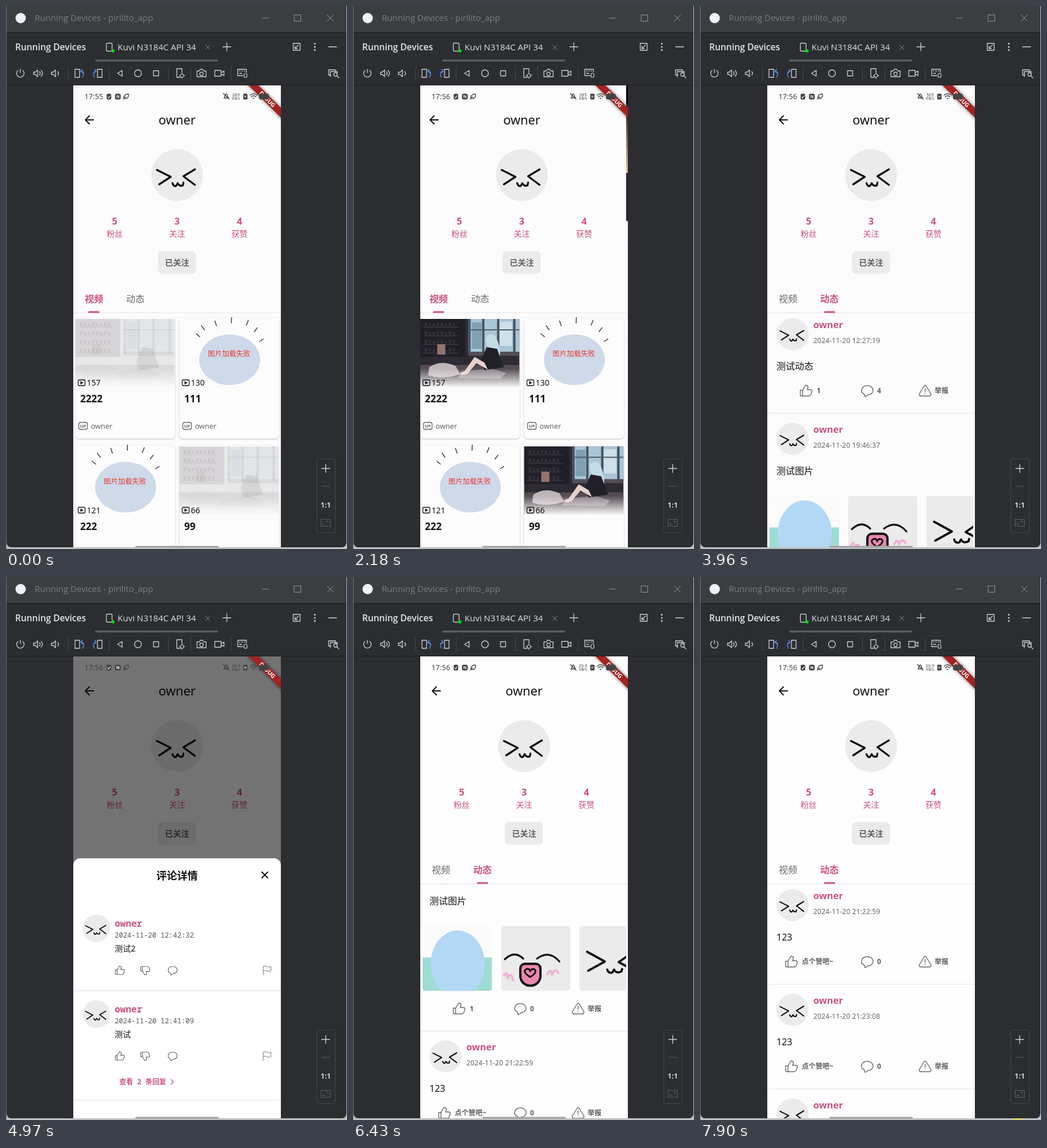
An HTML page with a canvas for the animation above (7970 ms loop, 593 by 944 pixels).

```html
<!DOCTYPE html>
<html lang="zh-CN">
<head>
<meta charset="utf-8">
<title>Running Devices</title>
<style>
html, body { margin: 0; width: 100%; height: 100%; overflow: hidden; background: #2b2d30; }
canvas { display: block; width: 593px; height: 944px; }
</style>
</head>
<body>
<canvas id="stage"></canvas>
<script>
const LOOP = 7970;
const USER = 'owner';
const PINK = '#c95478', GRAY = '#666', TILE = '#ebebeb', PAGE = '#fcfcfc', CHROME = '#ced0d6';
const SANS = '"Noto Sans", "Noto Sans CJK SC", "Noto Sans CJK", sans-serif';
const MONO = '"Noto Sans Mono", "Noto Sans CJK SC", "Noto Sans CJK", monospace';
const UI = '"Open Sans", sans-serif';

const canvas = document.getElementById('stage');
const c = canvas.getContext('2d');
const dpr = window.devicePixelRatio || 1;
canvas.width = 593 * dpr;
canvas.height = 944 * dpr;

// ---- helpers ----
const clamp = v => Math.max(0, Math.min(1, v));
const lin = (t, a, b) => clamp((t - a) / (b - a));
const ease = (t, a, b) => 1 - Math.pow(1 - lin(t, a, b), 3);
const smooth = (t, a, b) => { const u = lin(t, a, b); return u * u * (3 - 2 * u); };

function text(s, x, cy, size, color = '#111', { w = 400, align = 'left', font = SANS } = {}) {
  c.font = `${w} ${size}px ${font}`;
  c.textAlign = align;
  c.fillStyle = color;
  c.fillText(s, x, cy + size * 0.36);
}
function box(x, y, w, h, color) { c.fillStyle = color; c.fillRect(x, y, w, h); }
function round(x, y, w, h, r, fill, stroke, lw = 1) {
  c.beginPath();
  c.roundRect(x, y, w, h, r);
  if (fill) { c.fillStyle = fill; c.fill(); }
  if (stroke) { c.strokeStyle = stroke; c.lineWidth = lw; c.stroke(); }
}
function disc(x, y, r, color) {
  c.beginPath();
  c.arc(x, y, r, 0, 7);
  c.fillStyle = color;
  c.fill();
}
function oval(x, y, rx, ry, color) {
  c.beginPath();
  c.ellipse(x, y, rx, ry, 0, 0, 7);
  c.fillStyle = color;
  c.fill();
}
function icon(d, x, y, color = GRAY, lw = 1.4, sx = 1, sy = sx) {
  c.save();
  c.translate(x, y);
  c.scale(sx, sy);
  c.lineCap = c.lineJoin = 'round';
  c.strokeStyle = color;
  c.lineWidth = lw / sx;
  c.stroke(new Path2D(d));
  c.restore();
}
function shape(d, color) { c.fillStyle = color; c.fill(new Path2D(d)); }
function fade(y0, y1, from, to) {
  const g = c.createLinearGradient(0, y0, 0, y1);
  g.addColorStop(0, from);
  g.addColorStop(1, to);
  return g;
}
function clipped(x, y, w, h, r, draw) {
  c.save();
  c.beginPath();
  c.roundRect(x, y, w, h, r);
  c.clip();
  draw();
  c.restore();
}
function shifted(x, y, draw) {
  c.save();
  c.translate(x, y);
  draw();
  c.restore();
}
function faded(a, draw) {
  c.save();
  c.globalAlpha *= a;
  draw();
  c.restore();
}

const LIKE = 'M-10-1h4v10h-2q-2 0-2-2zM-6-1l4-7q1-3 4-1q2 1 1 4l-1 3h5q4 0 3 4l-2 5q-1 2-3 2h-11';
const BUBBLE = 'M-5 6C-14 2-10-9 0-9C13-9 13 7 1 7q-1 2-5 3z';
const WARN = 'M-2-8q2-3 4 0l8 13q1 4-3 4h-14q-4 0-3-4zM0-4v5M0 4v.6';
const FLAG = 'M-7 8v-15q4-2 7 0t7 0v8q-4 2-7 0t-7 0';
const CROSS = 'M-5-5l10 10M5-5l-10 10';

function face(x, y, r) {
  disc(x, y, r, TILE);
  icon('M-35-9L-11 3L-31 16M31-10L11 2L31 17M-8 14q2 6 6 5l3-5q3 6 9 4l1-5', x, y, '#111', 3.4 * r / 45, r / 45);
}
function playBadge(x, y, w, h, color) {
  round(x, y, w, h, 2, null, color, 1.3);
  const mx = x + w / 2, my = y + h / 2;
  shape(`M${mx - 2} ${my - 3}l5 3l-5 3z`, color);
}
function upBadge(x, y) {
  round(x, y, 15, 12, 3, null, GRAY, 1.3);
  text('UP', x + 7.5, y + 6, 7.5, GRAY, { w: 700, align: 'center' });
}
function dots(x, y) { for (const d of [-7, 0, 7]) disc(x + d, y, 1.3, '#888'); }

// Dim room with a bright window and a seated silhouette, 173 x 119 units.
function scene(x, y, w, h, lamp = false) {
  clipped(x, y, w, h, 0, () => {
    c.translate(x, y);
    c.scale(w / 173, h / 119);
    box(0, 0, 173, 119, '#2d2a34');
    box(0, 0, 78, 66, '#201f27');
    for (let i = 0; i < 4; i++) {
      box(5, 14 + i * 15, 62, 1, '#45414a');
      for (let j = 0; j < 8; j++) box(8 + j * 7, 6 + i * 15 + j % 3, 4, 7 - j % 3, j % 2 ? '#302d36' : '#37313a');
    }
    box(84, 0, 89, 58, '#a9c6d6');
    box(90, 6, 17, 46, '#7f9fb4');
    box(138, 5, 22, 42, '#cfe0e8');
    for (const px of [84, 108, 134, 162]) box(px, 0, 4, 60, '#454f5d');
    box(84, 18, 89, 2, '#4f5c6a');
    box(30, 44, 14, 18, '#94736f');
    box(84, 57, 89, 7, '#514d58');
    box(0, 80, 173, 39, '#554b53');
    shape('M16 84Q36 70 62 82L70 96Q40 106 14 98z', '#bfb6bb');
    shape('M70 92L122 86L150 94L140 104L66 103z', '#8d8288');
    shape('M114 34Q119 23 130 29Q141 46 139 66L126 70L117 48z', '#c5dbe5');
    shape('M116 49L134 52L146 84L112 89L106 72z', '#1f2028');
    shape('M112 76L95 66L78 90L70 94L72 98L82 96L98 77L118 88z', '#e5d0cc');
    if (lamp) {
      box(0, 0, 24, 78, fade(8, 70, '#3a2c2e', '#eebd9e'));
      box(0, 70, 24, 49, '#2b2529');
    }
  });
}
function failedImage(x, y) {
  const spokes = [[-52, -31], [-44, -43], [-23, -50], [3, -55], [29, -51], [43, -40], [52, -23]];
  for (const [a, b] of spokes) icon(`M${a} ${b}l${a * 0.12} ${b * 0.17}`, x, y, '#333', 1.4);
  oval(x, y + 9, 53, 44, '#ced9ea');
  text('图片加载失败', x - 1, y - 1, 12.3, '#e8392f', { align: 'center' });
}

// ---- window ----
function chrome() {
  box(0, 0, 593, 944, '#bfc0c2');
  box(0, 0, 1, 944, '#77797c');
  round(1, -8, 591, 949, 8, '#2b2d30');
  box(1, 0, 591, 46, '#3b3e40');
  box(1, 45.5, 591, 1.5, '#1e1f22');
  box(1, 137, 591, 1, '#1e1f22');
  disc(25.5, 21, 9, '#eef3fb');
  text('Running Devices - pirilito_app', 50, 21, 15, '#7c7e80', { font: UI });
  const dim = '#94969a';
  icon('M-5.5 0h11', 451, 21, dim, 1);
  icon('M-5.5-5.5h11v11h-11z', 507, 21, dim, 1);
  icon(CROSS, 564, 21, dim, 1, 1.1);

  text('Running Devices', 16, 71.5, 15.5, '#e6e7e9', { w: 600, font: UI });
  round(174.5, 64.5, 10, 14, 2, null, CHROME, 1.3);
  disc(186, 78, 2.8, '#00dc14');
  text('Kuvi N3184C API 34', 194, 71.5, 15, '#dfe1e5', { font: UI });
  icon(CROSS, 351, 72, '#85878c', 1, 0.75);
  icon('M-7 0h14M0-7v14', 384, 71, CHROME, 1.3);
  round(155, 93, 214, 3.5, 2, '#5b5d63');
  icon('M-6-6h12v12h-12zM3-3l-6 6M-3-1v4h4', 505.5, 71, CHROME, 1.3);
  for (const y of [65.5, 71, 76.5]) disc(537, y, 1.5, CHROME);
  icon('M-7 0h14', 568, 71, CHROME, 1.4);
  toolbar();

  round(540.5, 787.5, 32, 128, 3, null, '#43454a');
  icon('M-7 0h14M0-7v14', 556, 804, CHROME, 1.4);
  icon('M-7 0h14', 556, 835, '#5a5d63', 1.2);
  text('1:1', 556, 867, 12.5, CHROME, { w: 700, align: 'center', font: UI });
  icon('M-8-6h16v12h-16zM-4 0v3h3M4 0v-3h-3', 556, 898.5, '#5a5d63', 1.2);
}
function toolbar() {
  const y = 117;
  const speaker = 'M-8-2h3l4-4v12l-4-4h-3z';
  const device = 'M-4-7h8v14h-8z';
  for (const x of [108, 179, 282, 321, 391]) box(x, 105, 1, 24, '#43454a');
  const tools = [
    ['M0-7v6M-4-5A6.5 6.5 0 1 0 4-5', 25], [speaker + 'M2-3q3 3 0 6M5-5q5 5 0 10', 56],
    [speaker + 'M3-3q3 3 0 6', 87], [device, 124], [device, 163],
    ['M4-5v10L-4 0z', 198], ['M6 0A6 6 0 1 1-6 0A6 6 0 1 1 6 0', 229.5], ['M-4.5-4.5h9v9h-9z', 261],
    ['M1 7h-6v-15h9v6', 302], ['M-8-4h4l2-3h4l2 3h4v10h-16zM3 1A3 3 0 1 1-3 1A3 3 0 1 1 3 1', 340],
    ['M-8-5h11v10h-11zM3-1l5-3v8l-5-3', 371],
    ['M1 4h-9v-11h15v5M-5-4h1M-1-4h1M3-4h1M-5 0h4', 411], ['M-4 3h-4v-9h12v2M-5 6v-9h12v3', 569]
  ];
  for (const [d, x] of tools) icon(d, x, y, CHROME, 1.3);
  const turn = 'M-1-4Q6-2 1 7M1-7l-3 3l3 3';
  icon(turn, 132, y, '#548af7', 1.5);
  icon(turn, 155, y, '#548af7', 1.5, -1, 1);
  icon('M3 0A3 3 0 1 1-3 0A3 3 0 1 1 3 0M0-5v2M0 3v2M-5 0h2M3 0h2', 306, 121, CHROME, 1.2);
  round(414, 117, 5, 7, 2, null, CHROME, 1.2);
  icon('M3 0A3 3 0 1 1-3 0A3 3 0 1 1 3 0M2 2l4 4', 573, 119, CHROME, 1.3);
}

// ---- status bar and ribbon ----
function status(t) {
  const ink = '#444';
  const video = t >= 1340 && t < 1900;
  text(t < 300 ? '17:55' : '17:56', 136.5, 157, 12.7, video && t >= 1550 ? '#ddd' : ink);
  round(175, 152.5, 8, 10, 2, ink);
  icon('M-2 0l1.5 2l3-4', 179, 158, '#fff', 1.1);
  round(189.5, 152.5, 10, 10, 3, ink);
  text('N', 194.5, 157.5, 7, '#fff', { w: 700, align: 'center' });
  icon('M-4 3Q-4-4 4-4Q5 4-2 4M-5 5l4-4', 209, 157, ink, 1.4);
  if (video) return;
  icon('M-4 3h8q-2-2-2-5q-2-4-4 0q0 3-2 5M-5-5L5 5', 383, 157, ink, 1.4);
  const rate = t < 3220 ? '285' : t < 4970 ? '505' : '29.5';
  text(rate, 400, 154.5, 7.5, ink, { align: 'center' });
  text('KB/s', 400, 161, 6.5, ink, { align: 'center' });
  round(412.5, 152.5, 7.5, 10, 1.5, ink);
  icon('M-1.5-1.5l3 3M1.5-1.5l-3 3', 416.2, 157.5, '#fff', 1);
  icon('M-6-2Q0-7 6-2M-4 1Q0-3 4 1M-1 3.5h2', 430.5, 157, ink, 1.4);
  round(440, 152.5, 17, 10, 3, ink);
}
function ribbon() {
  c.save();
  c.translate(478.5, 138);
  c.rotate(Math.PI / 4);
  c.shadowColor = 'rgba(0,0,0,.6)';
  c.shadowBlur = 6 * dpr;
  box(-60, 28, 120, 12, '#a32222');
  c.shadowBlur = 0;
  text('DEBUG', 0, 34, 10.2, '#fff', { w: 800, align: 'center' });
  c.restore();
}

// ---- profile ----
function card(x, y, plays, title, thumbAlpha) {
  c.save();
  c.shadowColor = 'rgba(0,0,0,.25)';
  c.shadowBlur = 2.5 * dpr;
  c.shadowOffsetY = dpr;
  round(x, y, 173.5, 210, 6, PAGE);
  c.restore();
  if (thumbAlpha === null) failedImage(x + 87.5, y + 64);
  else {
    faded(thumbAlpha, () => scene(x, y + 2, 173, 119));
    box(x, y + 88, 173.5, 34, fade(y + 88, y + 122, 'rgba(252,252,252,0)', PAGE));
  }
  playBadge(x + 5, y + 108, 12, 10, '#111');
  text(plays, x + 20, y + 113, 14, '#111');
  text(title, x + 8.5, y + 141, 17, '#111', { w: 700 });
  upBadge(x + 6, y + 182);
  text(USER, x + 27, y + 188, 12.6, GRAY);
}
function grid(t) {
  const a = 0.09 + 0.91 * lin(t, 60, 480);
  card(120.5, 542, '157', '2222', a);
  card(301.5, 542, '130', '111', null);
  card(120.5, 763.5, '121', '222', null);
  card(301.5, 763.5, '66', '99', a);
}
function action(d, x, label, tx, y) {
  icon(d, x, y, GRAY, 1.4);
  text(label, tx, y, 12, '#5c5c5c', { w: 600 });
}
function post(y, date, body, likes, replies, picAlpha) {
  face(161, y + 16.5, 28);
  text(USER, 197, y, 16.4, PINK, { w: 600 });
  text(date, 197, y + 28, 12.3, GRAY);
  text(body, 133, y + 72, 16, '#111');
  let ay = y + 115;
  if (picAlpha !== undefined) {
    pictures(y + 115.5, picAlpha);
    ay = y + 259.5;
  }
  if (likes) action(LIKE, 184.5, likes, 203, ay);
  else action(LIKE, 159, '点个赞吧~', 177, ay);
  action(BUBBLE, 291, replies, 308, ay);
  action(WARN, 391.5, '举报', 408, ay);
  box(117, ay + 38.5, 362, 1, '#e2e2e2');
}
function pictures(y, alpha) {
  for (const x of [121, 257.5]) round(x, y, 120.5, 113, 5, TILE);
  round(394, y, 81, 113, [5, 0, 0, 5], TILE);
  faded(alpha, () => {
    clipped(121, y, 120.5, 113, 5, () => {
      box(121, y, 121, 55, '#fbfbfb');
      box(121, y + 55, 121, 58, '#9fdcd4');
      oval(182, y + 66, 47, 58, '#b3d8f4');
    });
    const mx = 308, my = y + 80;
    icon('M-44-22Q-27-38-12-23M12-23Q33-39 51-18', mx, my, '#111', 3.2);
    icon('M-45 6q5-10 6 5q7-13 9 4M30 4q6-12 8 1q6-14 11-3', mx, my, '#edb2d4', 4);
    round(mx - 17, my - 14, 35, 38, [8, 8, 17, 17], '#ec86ad', '#111', 4);
    icon('M0 8Q-15-2-6-6Q-1-7 0-2Q3-8 8-5Q13 0 0 8', mx, my + 1, '#111', 3);
    clipped(394, y, 81, 113, 0, () =>
      icon('M-42-17L-11 0L-40 16M39-17L13 1L39 15M-7 14q2 7 9 5l3-5q4 8 13 3l1-4', 449, y + 62, '#111', 3.8));
  });
}
function feed(t) {
  const shift = 245 * smooth(t, 5940, 6360) + 257 * smooth(t, 6640, 7400) + 6 * smooth(t, 7480, 7800);
  shifted(0, -shift, () => {
    post(554, '2024-11-20 12:27:19', '测试动态', '1', '4');
    post(736, '2024-11-20 19:46:37', '测试图片', '1', '0', lin(t, 3000, 3430));
    post(1062, '2024-11-20 21:22:59', '123', '', '0');
    post(1244, '2024-11-20 21:23:08', '123', '', '0');
    post(1426, '2024-11-20 21:23:16', '123', '', '0');
  });
}
function profile(t) {
  const tab = smooth(t, 2450, 2870);
  box(117, 138, 362, 803, t < 5800 ? PAGE : '#fefefe');
  icon('M7 0h-14M0-7l-7 7l7 7', 145, 198, '#111', 2);
  text(USER, 297.5, 198, 21.8, '#111', { align: 'center' });
  face(297.5, 294, 45);
  for (const [x, n, label] of [[189, '5', '粉丝'], [297.5, '3', '关注'], [406, '4', '获赞']]) {
    text(n, x, 374, 16.5, PINK, { w: 600, align: 'center' });
    text(label, x, 396, 14, PINK, { align: 'center' });
  }
  round(264, 426, 66.5, 39.5, 8, TILE);
  text('已关注', 297.5, 446, 14, '#5f5f5f', { w: 700, align: 'center' });
  ['视频', '动态'].forEach((s, i) => {
    const on = (tab > 0.5) === (i === 1);
    text(s, 153 + 72 * i, 509, 16, on ? PINK : GRAY, { w: on ? 700 : 400, align: 'center' });
  });
  box(117, 533, 362, 1, '#e6e6e6');
  round(143 + 72.5 * tab, 530.5, 19.5, 3, [2, 2, 0, 0], PINK);
  clipped(117, 534, 362, 407, 0, () => {
    if (tab < 1) shifted(-362 * tab, 0, () => grid(t));
    if (tab > 0) shifted(362 * (1 - tab), 0, () => feed(t));
  });
}

// ---- video page ----
function videoPage(t) {
  box(117, 138, 362, 803, PAGE);
  if (t >= 1550) {
    box(117, 138, 362, 236, '#000');
    scene(117, 170, 362, 204, true);
  } else if (t >= 1270) box(358.5, 138, 120.5, 32, '#000');
  box(117, 373.5, 362, 1, '#ddd');
  text('简介', 164.5, 393, 13.7, PINK, { w: 500, align: 'center' });
  text('评论', 240, 393, 13.7, GRAY, { align: 'center' });
  round(155, 408.5, 19, 3, 1.5, PINK);
  box(117, 411, 362, 1, '#ddd');
  round(284, 376.5, 187, 32.5, 16, '#fff', '#f6a797', 2);
  round(284, 376.5, 47, 32.5, 16, '#fba997');
  ['#70404a', '#e6c29c', '#eab0a0', '#ecc590'].forEach((col, i) => box(302 + 46.3 * i, 387, 12, 12, col));

  const loaded = lin(t, 1480, 1760);
  disc(148.5, 442, 18, TILE);
  if (loaded < 0.5) dots(148.5, 442);
  else face(148.5, 442, 18);
  text(USER, 178, 436, 14.3, '#111');
  text('5粉丝', 178, 453, 10, GRAY);
  round(373.5, 427.5, 90.5, 31, 15.5, TILE, '#dedede');
  icon('M-4.5 0h9M0-4.5v9', 397, 442.5, '#444', 1.4);
  text('已关注', 406, 443, 14, '#444', { w: 500 });
  text('2222', 134.5, 484, 15.9, '#111');
  icon('M-5-3l5 5l5-5', 457.5, 485, PINK, 2);
  playBadge(136, 503, 13, 11, GRAY);
  text('157', 154.5, 508.5, 12.3, GRAY);
  text('2024-11-12 18:44', 182.5, 508.5, 12.4, GRAY);
  icon(LIKE, 186, 546.5, GRAY, 1.5, 1.1);
  icon(LIKE, 288, 546.5, GRAY, 1.5, 1.1, -1.1);
  icon(WARN, 391, 547.5, GRAY, 1.5, 1.1);
  text('点个赞吧~', 187, 570, 12, GRAY, { align: 'center' });
  text('不喜欢', 290, 570, 12, GRAY, { align: 'center' });
  text('举报', 392, 570, 12, GRAY, { align: 'center' });
  box(117, 581, 362, 1, '#e6e6e6');
  [['1234567', '26'], ['123456', '18'], ['12345', '20'], ['1234', '22']].forEach(([title, plays], i) => {
    const y = 582 + 109.8 * i;
    round(122.5, y + 8, 172.5, 94, 5, '#ececec');
    dots(208.5, y + 55);
    faded(loaded, () => scene(122.5, y + 8, 172.5, 94));
    text(title, 303, y + 19, 14, '#111');
    upBadge(305, y + 63);
    text(USER, 326, y + 69, 12.5, GRAY);
    playBadge(305, y + 86.5, 15, 12, GRAY);
    text(plays, 326, y + 92.5, 12.3, GRAY);
    text('2024-11-21', 372, y + 92.5, 12.3, GRAY);
    box(117, y + 109, 362, 1, '#eee');
  });
}

// ---- comment sheet ----
function comment(y, date, body) {
  face(157, y + 9, 24);
  text(USER, 189, y, 16, PINK, { w: 600, font: MONO });
  text(date, 189, y + 21, 12.1, '#555', { w: 500, font: MONO });
  text(body, 189, y + 44, 14, '#111', { font: MONO });
  icon(LIKE, 198, y + 82, GRAY, 1.2, 0.78);
  icon(LIKE, 242, y + 82, GRAY, 1.2, 0.78, -0.78);
  icon(BUBBLE, 290, y + 82, GRAY, 1.2, 0.78);
  icon(FLAG, 454, y + 82, '#888', 1.1, 0.95);
}
function sheet(t) {
  const open = ease(t, 4160, 4480), close = lin(t, 5740, 5940);
  if (!open || close === 1) return;
  box(117, 138, 362, 803, `rgba(0,0,0,${0.54 * open * Math.pow(1 - close, 1.6)})`);
  const top = 941 - 452 * open * (1 - Math.pow(close, 2.15));
  round(117, top, 361, 470, [12, 12, 0, 0], '#fff');
  text('评论详情', 297.5, top + 30.5, 18, '#111', { w: 600, align: 'center' });
  icon(CROSS, 450, top + 29, '#111', 2);
  const scroll = 74 * Math.sin(Math.PI * lin(t, 4970, 5700));
  clipped(117, top + 55, 362, 420, 0, () => shifted(0, top - scroll, () => {
    comment(113, '2024-11-20 12:42:32', '测试2');
    box(117, 230, 362, 1, '#ddd');
    comment(262, '2024-11-20 12:41:09', '测试');
    text('查看 2 条回复', 197, 389, 12, PINK, { w: 600, font: MONO });
    icon('M-2-4l4 4l-4 4', 289, 388.5, PINK, 1.4);
    box(117, 420, 362, 1, '#ddd');
  }));
}

// ---- loop ----
function draw(t) {
  c.setTransform(dpr, 0, 0, dpr, 0, 0);
  chrome();
  clipped(117, 138, 361, 803, 0, () => {
    const push = ease(t, 720, 1130) * (1 - ease(t, 1869, 2269));
    if (push < 1) shifted(-362 * push, 0, () => clipped(117, 138, 362, 803, 0, () => profile(t)));
    if (push > 0) shifted(362 * (1 - push), 0, () => videoPage(t));
    sheet(t);
    ribbon();
    status(t);
  });
  round(225, 938.5, 145, 3.5, 2, '#a6a7a9');
  if (t >= 7830) box(546, 941, 15, 3, '#dfd65a');
}
function step(t) {
  const off = t < 2400 ? 10 : 0;
  return Math.max(0, Math.floor((t - off) / 70) * 70 + off);
}
const start = performance.now();
function tick() {
  draw(step((performance.now() - start) % LOOP));
  requestAnimationFrame(tick);
}
tick();
</script>
</body>
</html>
```
